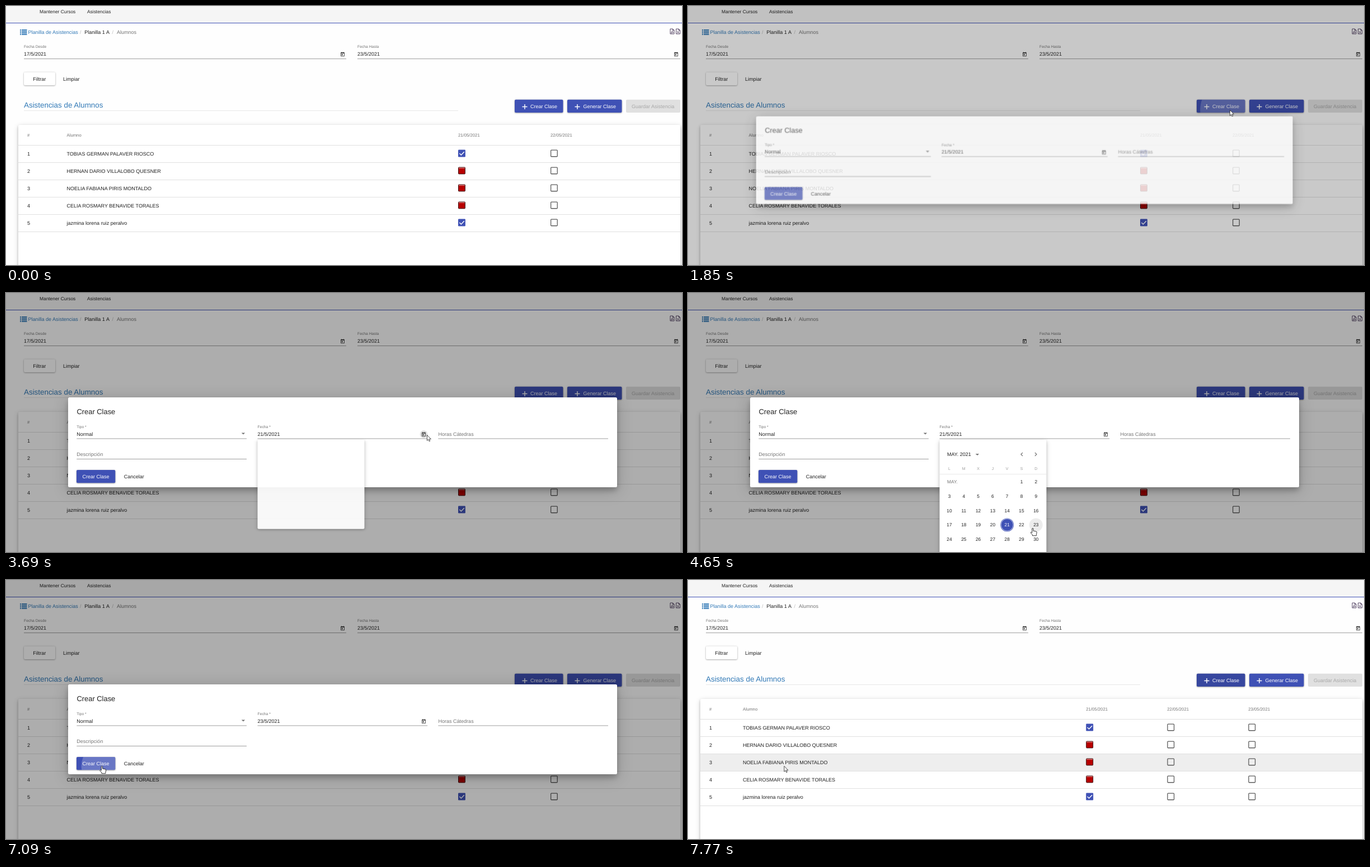
An HTML page that plays this animation: 1208 px wide and 464 px high, repeating every 8000 ms.

```html
<!DOCTYPE html>
<html lang="es">
<head>
<meta charset="utf-8">
<title>Planilla de Asistencias</title>
<style>
html, body { margin: 0; width: 100%; height: 100%; overflow: hidden; background: #fff; }
svg { display: block; font-family: "Liberation Sans", Arial, sans-serif; text-rendering: geometricPrecision; }
.raised { filter: drop-shadow(0 1.2px .8px rgba(0,0,0,.26)) drop-shadow(0 .5px 1.4px rgba(0,0,0,.14)); }
.card { filter: drop-shadow(0 2px 2px rgba(0,0,0,.18)) drop-shadow(0 2px 4px rgba(0,0,0,.16)); }
.modal { filter: drop-shadow(0 6px 5px rgba(0,0,0,.2)) drop-shadow(0 4px 13px rgba(0,0,0,.2)); }
</style>
</head>
<body>
<svg id="stage" width="1208" height="464" viewBox="0 0 1208 464"></svg>
<script>
const LOOP = 8000, BLUE = '#3f51b5', DARK = '#222', GREY = '#757575', FONT = 9.03;

// Markup helpers
const text = (x, cy, s, size = FONT, fill = DARK, extra = '') =>
  `<text x="${x}" y="${cy + size * .36}" font-size="${size}" fill="${fill}" ${extra}>${s}</text>`;
const rect = (x, y, w, h, fill, extra = '') =>
  `<rect x="${x}" y="${y}" width="${w}" height="${h}" fill="${fill}" ${extra}/>`;
const path = (d, stroke, width = 1, fill = 'none', extra = '') =>
  `<path d="${d}" stroke="${stroke}" stroke-width="${width}" fill="${fill}" ${extra}/>`;
const group = (id, body, extra = '') => `<g id="${id}" ${extra}>${body}</g>`;
const button = (x, y, w, fill) => rect(x, y, w, 23.3, fill, 'rx="2" class="raised"');
const plus = (x, y) => path(`M${x - 4.5} ${y}h9M${x} ${y - 4.5}v9`, '#fff', 1.4);
const dateIcon = (x, y) =>
  path(`M${x - 3} ${y - 3}h6v6.4h-6zM${x - 1.8} ${y - 4.2}v1M${x + 1.8} ${y - 4.2}v1`, '#444', .9) +
  rect(x - 3, y - 3, 6, 1.5, '#444') + rect(x - 1.8, y - .4, 2.2, 2.2, '#444');
const triangle = (x, y, id = '') => path(`M${x - 3.2} ${y - 1.6}h6.4l-3.2 3.2z`, 'none', 0, GREY, id);

function field(x, w, y, label, value) {
  return text(x, y - 13, label, 6.77, GREY) + text(x, y, value) + rect(x, y + 8.2, w, .9, '#949494');
}

function fileIcon(x, mark) {
  return path(`M${x} 41h4.5l2.5 2.5v6.5h-7zM${x + 4.5} 41v2.5h2.5`, '#435', .9) + path(mark, '#435', .8);
}

function checkbox(x, y, state) {
  if (state === 'on') return rect(x, y, 12.9, 12.9, BLUE, 'rx="1.2"') +
    path(`M${x + 2.4} ${y + 6.6}l2.9 2.9 5.5-5.8`, '#fff', 1.4);
  if (state === 'red') return rect(x + .5, y + .5, 11.9, 11.9, '#b80000', 'stroke="#3a1010" rx=".8"') +
    rect(x + 1, y + 1.2, 10.9, .9, '#f0c4c4');
  return rect(x + .65, y + .65, 11.6, 11.6, 'none', 'stroke="#5c5c5c" stroke-width="1.3" rx="1"');
}

const students = ['TOBIAS GERMAN PALAVER RIOSCO', 'HERNAN DARIO VILLALOBO QUESNER',
  'NOELIA FABIANA PIRIS MONTALDO', 'CELIA ROSMARY BENAVIDE TORALES', 'jazmina lorena ruiz peralvo'];
const marks = ['on', 'red', 'red', 'red', 'on'];

function table(id, nameX, cols) {
  let s = text(nameX, 231, 'Alumno', 7.74, GREY);
  cols.forEach((x, c) => s += text(x, 231, `${21 + c}/05/2021`, 7.74, GREY));
  students.forEach((name, i) => {
    s += text(nameX, 265 + 31 * i, name);
    cols.forEach((x, c) => s += checkbox(x, 257.5 + 31 * i, c ? '' : marks[i]));
  });
  return group(id, s);
}

function page() {
  let s = rect(0, 0, 1208, 464, '#fefefe') + rect(0, 0, 1208, 30, '#f5f5f5') + rect(0, 30, 1208, 1, BLUE) +
    text(60, 9.5, 'Mantener Cursos', 8.4) + text(145, 9.5, 'Asistencias', 8.4);
  for (let i = 0; i < 4; i++) {
    s += rect(25, 42 + i * 2.7, 2, 1.8, '#337ab7') + rect(28, 42 + i * 2.7, 9.5, 1.8, '#337ab7');
  }
  s += text(39.5, 47, 'Planilla de Asistencias', FONT, '#337ab7') + text(132, 47, '/', FONT, '#bbb') +
    text(140.3, 47, 'Planilla 1 A') + text(189.5, 47, '/', FONT, '#bbb') + text(198, 47, 'Alumnos', FONT, GREY) +
    fileIcon(1187, 'M1188.5 48.5l2-4 2 3z') + fileIcon(1197.5, 'M1199.3 45l3.2 4m0-4l-3.2 4') +
    field(32, 576, 86, 'Fecha Desde', '17/5/2021') + dateIcon(601.5, 86.5) +
    field(628, 577, 86, 'Fecha Hasta', '23/5/2021') + dateIcon(1197.5, 86.5) +
    button(32, 118.7, 56, '#fff') + text(48.3, 130.5, 'Filtrar') + text(102, 130.5, 'Limpiar') +
    text(32, 177, 'Asistencias de Alumnos', 13.4, '#337ab7') + rect(32, 187, 776, .9, '#e6e6e6') +
    button(909, 167.7, 86.5, BLUE) + rect(909, 167.7, 86.5, 23.3, '#000', 'rx="2" id="focus"') +
    '<g clip-path="url(#clipA)"><circle id="rippleA" cx="968" cy="186" fill="#fff"/></g>' +
    plus(927, 180.5) + text(937, 179.5, 'Crear Clase', FONT, '#fff') +
    button(1003, 167.7, 97.5, BLUE) + plus(1021, 180.5) + text(1031.5, 179.5, 'Generar Clase', FONT, '#fff') +
    rect(1108, 167.7, 97, 23.3, '#e0e0e0', 'rx="2"') + text(1118, 179.5, 'Guardar Asistencia', FONT, '#a8a8a8') +
    rect(22, 213, 1183, 270, '#fff', 'rx="2" class="card"') + rect(22, 0, 1183, 30.5, '#eee', 'id="hover"');
  for (let i = 0; i < 6; i++) s += rect(22, 249 + 31 * i, 1183, 1, '#e0e0e0');
  s += text(38, 231, '#', 7.74, GREY);
  for (let i = 0; i < 5; i++) s += text(38, 265 + 31 * i, i + 1);
  return s + table('before', 108.5, [808, 973]) + table('after', 98, [711.3, 856.3, 1001.3]);
}

function dialog() {
  const body = text(126.5, 212.5, 'Crear Clase', 12.9) +
    field(126.3, 303.7, 252.3, 'Tipo *', 'Normal') + triangle(424, 252) +
    group('typeFocus', text(126.3, 239.3, 'Tipo *', 6.77, BLUE) + rect(126.3, 260.2, 303.7, 1.4, BLUE) +
      path('M420.8 250.4h6.4l-3.2 3.2z', 'none', 0, BLUE)) +
    field(449.5, 303.7, 252.3, 'Fecha *', '<tspan id="date"></tspan>') +
    '<circle id="iconFocus" cx="746.5" cy="253" r="6.8" fill="#ddd"/>' + dateIcon(746.5, 253.3) +
    text(772.5, 252.3, 'Horas Cátedras', FONT, GREY) + rect(772.3, 260.5, 303.7, .9, '#949494') +
    text(126.3, 289, 'Descripción', FONT, GREY) + rect(126.3, 297, 303.7, .9, '#949494') +
    button(126, 317, 69.3, BLUE) +
    '<g clip-path="url(#clipB)"><circle id="rippleB" cx="172" cy="333" fill="#fff"/></g>' +
    text(136.5, 329, 'Crear Clase', FONT, '#fff') + text(210.7, 329, 'Cancelar');
  return group('dialog', rect(111, 187, 981, 161, '#fff', 'rx="2.5"') + group('dialogBody', body), 'class="modal"');
}

function calendar() {
  const col = c => 467 + 25.8 * c, row = r => 338 + 25.8 * r, mid = 'text-anchor="middle"';
  let s = text(463, 289, 'MAY. 2021') + triangle(517, 289.5) +
    path('M598 286l-3 3 3 3M620 286l3 3-3 3', GREY, 1.2) + rect(449.5, 324, 191, .7, '#e0e0e0') +
    text(463, row(0), 'MAY.', 8.4, GREY) +
    `<circle cx="${col(4)}" cy="${row(3)}" r="12" fill="${BLUE}"/>` +
    `<circle cx="${col(4)}" cy="${row(3)}" r="11" fill="none" stroke="#fff" stroke-width=".7"/>` +
    `<circle id="dayHover" cx="${col(6)}" cy="${row(3)}" r="12" fill="#ececec"/>`;
  [...'LMXJVSD'].forEach((d, c) => s += text(col(c), 314, d, 7.1, '#9e9e9e', mid));
  for (let d = 1; d <= 31; d++) {
    const n = d + 4;
    s += text(col(n % 7), row(Math.floor(n / 7)), d, 8.4, d === 21 ? '#fff' : DARK, mid);
  }
  return group('calendar', rect(449.5, 263, 191, 228, '#fff', 'rx="2.5"') + group('days', s), 'class="card"');
}

const clip = (id, x, y, w) => `<clipPath id="${id}">${rect(x, y, w, 23.3, '#000', 'rx="2"')}</clipPath>`;
document.getElementById('stage').innerHTML =
  `<defs>${clip('clipA', 909, 167.7, 86.5)}${clip('clipB', 126, 317, 69.3)}</defs>` +
  page() + rect(0, 0, 1208, 464, '#000', 'id="shade"') + dialog() + calendar() +
  group('cursor',
    path('M.4 .4V10.4L2.7 8.3 4.2 11.8 5.8 11.1 4.3 7.7H7.4Z', '#222', .8, '#fff', 'id="arrow"') +
    path('M-1.2 .9Q0 -.5 1 .9V5L5.6 5.9Q7.4 6.3 7.2 8L6.4 11.5V13.6H-.6V12L-4 8.2Q-3.4 6.4-1.2 8.2Z',
      '#222', .9, '#fff', 'id="hand"'));

const el = id => document.getElementById(id);
const set = (id, attrs) => { for (const k in attrs) el(id).setAttribute(k, attrs[k]); };
const show = (id, on) => set(id, { visibility: on ? 'visible' : 'hidden' });
const prog = (t, start, length) => Math.min(1, Math.max(0, (t - start) / length));
const outQuad = p => p * (2 - p);
const outCubic = p => 1 - (1 - p) ** 3;

// Pointer track: time, x, y
const track = [[760, 1070, 338], [1230, 968, 186], [2320, 968, 186], [2900, 760, 262], [3130, 752, 254],
  [3840, 752, 254], [4390, 634, 422], [4540, 634, 422], [4720, 613, 421], [5460, 613, 421],
  [5530, 558, 383], [6100, 266, 309], [6270, 266, 309], [6800, 171.5, 333], [LOOP, 171.5, 333]];

function pointer(t) {
  const i = Math.max(1, track.findIndex(k => k[0] >= t));
  const [t0, x0, y0] = track[i - 1], [t1, x1, y1] = track[i];
  const p = outQuad(prog(t, t0, t1 - t0));
  return [x0 + (x1 - x0) * p, y0 + (y1 - y0) * p];
}

function draw(t) {
  const [x, y] = pointer(t);
  const hand = (t > 4300 && t < 5000) || (t > 6700 && t < 7200);
  set('cursor', { transform: `translate(${x} ${y})` });
  show('arrow', t >= 760 && !hand);
  show('hand', hand);

  const row = Math.floor((y - 249) / 31);
  show('hover', row >= 0 && row < 5 && ((t >= 760 && t < 1300) || t > 7400));
  set('hover', { y: 250 + 31 * row });
  show('before', t < 7770);
  show('after', t >= 7770);
  set('focus', { opacity: t > 7200 ? .12 : 0 });
  set('rippleA', { r: 62 * outQuad(prog(t, 1630, 360)), opacity: .22 * (1 - prog(t, 1860, 180)) });
  set('rippleB', { r: 48 * outQuad(prog(t, 6900, 360)), opacity: .22 });

  set('shade', { opacity: .32 * (outCubic(prog(t, 1730, 400)) - outCubic(prog(t, 7130, 430))) });
  const k = outCubic(prog(t, 1750, 175)), drop = 8.5 * (1 - prog(t, 1870, 100));
  show('dialog', t > 1750 && t < 7240);
  set('dialog', {
    opacity: k ** 2.5 * (1 - prog(t, 7110, 120)),
    transform: `translate(601.5 ${267.5 + drop}) scale(${.7 + .3 * k}) translate(-601.5 -267.5)`
  });
  set('dialogBody', { opacity: k ** 3 });
  set('typeFocus', { opacity: prog(t, 2350, 120) - prog(t, 3200, 150) });
  set('iconFocus', { opacity: (t > 3000 && t < 3900) || (t > 5000 && t < 6900) ? 1 : 0 });
  el('date').textContent = t < 5000 ? '21/5/2021' : '23/5/2021';

  const open = prog(t, 3610, 150);
  show('calendar', t > 3610 && t < 5140);
  set('calendar', {
    opacity: Math.min(1, open * 1.7) * (1 - prog(t, 4980, 140)),
    transform: `translate(0 263) scale(1 ${.35 + .65 * open}) translate(0 -263)`
  });
  set('days', { opacity: prog(t, 3700, 60) });
  set('dayHover', { opacity: t > 4390 ? 1 : 0 });
}

const start = performance.now();
function tick() {
  draw((performance.now() - start) % LOOP);
  requestAnimationFrame(tick);
}
tick();
</script>
</body>
</html>
```
